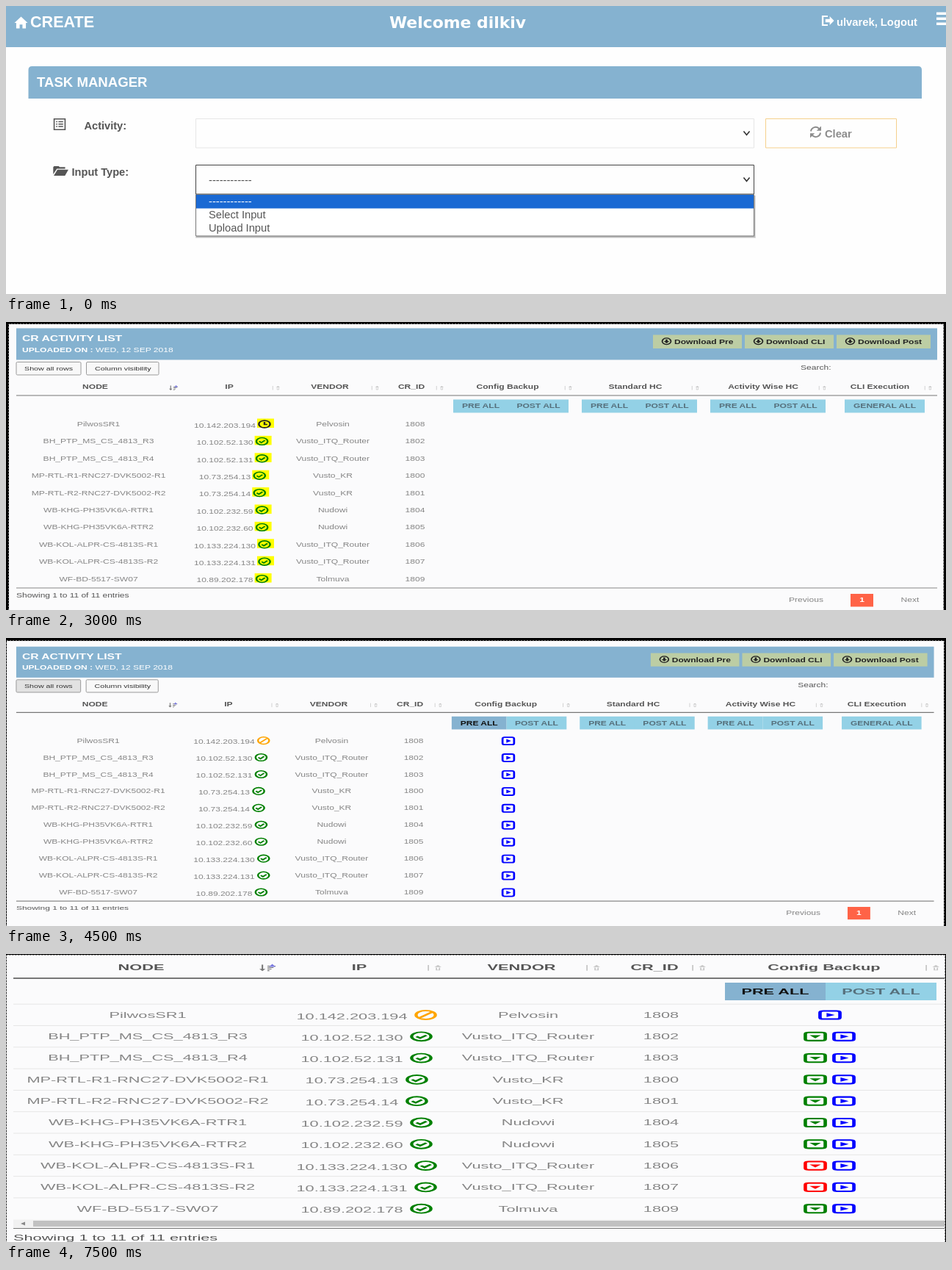
Recreate the animation shown at these times as an HTML page. Size 1280x392 px, loop 8000 ms.

```html
<!DOCTYPE html>
<html lang="en">
<head>
<meta charset="utf-8">
<title>Task manager tour</title>
<style>
html, body { margin: 0; width: 100%; height: 100%; overflow: hidden; background: #fefefe; }
svg { display: block; width: 100%; height: 100%; font-family: "Liberation Sans", Arial, sans-serif; }
.b { font-weight: bold; }
.m { text-anchor: middle; }
.v { font-family: "DejaVu Sans", sans-serif; }
.line { vector-effect: non-scaling-stroke; }
</style>
</head>
<body>
<svg id="stage" viewBox="0 0 1280 392"></svg>
<script>
const BLUE = '#85b2d0', SKY = '#93d1e6', GREEN = '#bccda4', INK = '#555', GREY = '#858585';
let wide = 1; // horizontal stretch of the current scene

const text = (x, y, s, size, fill = INK, cls = '') =>
  `<text transform="translate(${x} ${y}) scale(${wide} 1)" font-size="${size}" fill="${fill}" class="${cls}">${s}</text>`;
const rect = (x, y, w, h, fill, more = '') =>
  `<rect x="${x}" y="${y}" width="${w}" height="${h}" fill="${fill}" ${more}/>`;
const box = (x, y, w, h, stroke, fill = 'none', more = '') =>
  rect(x, y, w, h, fill, `stroke="${stroke}" class="line" ${more}`);
const path = (d, fill, stroke = 'none', w = 1) =>
  `<path d="${d}" fill="${fill}" stroke="${stroke}" stroke-width="${w}"/>`;
const rule = (x1, x2, y, color, w = 1) => path(`M${x1} ${y}H${x2}`, 'none', color, w);

// Icons live in a 16 unit box around 0,0: solid and outlined parts
const ring = 'M-6.8 0A6.8 6.8 0 1 1 6.8 0A6.8 6.8 0 1 1-6.8 0';
const frame = 'M-4.5-6.6H4.5Q7-6.6 7-4V4Q7 6.6 4.5 6.6H-4.5Q-7 6.6-7 4V-4Q-7-6.6-4.5-6.6z';
const icons = {
  home: ['M0-7.5L-8.5.5h2.3V7.5h4.4V2.5h3.6v5h4.4V.5h2.3z', ''],
  list: ['', 'M-7-7.2H7V7.2H-7zM-4.5-3.5h1.6M-1.5-3.5h6M-4.5-.3h1.6M-1.5-.3h6M-4.5 3h1.6M-1.5 3h6', 1.5],
  folder: ['M-8 5V-6l1-1.5h5l1 1.5h6v2.5H-4zM-7.4 7.5l4-9.5H8.5L4.8 7.5z', ''],
  logout: ['M-3-2.2H2.5V-6L8 0 2.5 6V2.2H-3z', 'M0-6H-6.5V6H0', 2.2],
  refresh: ['M7.5-8V-1.8H1.3zM-7.5 8V1.8H-1.3z', 'M-6.5-1A6.5 6.5 0 0 1 5-4.2M6.5 1A6.5 6.5 0 0 1-5 4.2', 2],
  check: ['', ring + 'M-3.4 0L-.8 2.5 3.6-2', 2.2],
  clock: ['', ring + 'M0-4.2V.6H3.5', 2.2],
  ban: ['', ring + 'M-4.8 4.8L4.8-4.8', 2.2],
  play: ['M-2.4-3.4L3.4 0-2.4 3.4z', frame, 2.4],
  caret: ['M-4-2H4L0 2.8z', frame, 2.4],
  down: ['M-1.5-4.2h3V-.4h2.8L0 4.4-4.3-.4h2.8z', ring, 2],
  up: ['M-1.5 4.2h3V.4h2.8L0-4.4-4.3.4h2.8z', ring, 2],
  search: ['', 'M-7-2A4.8 4.8 0 1 1 2.6-2A4.8 4.8 0 1 1-7-2M1.5 1.8L7 7', 2.6],
  tags: ['M-8-6.5H-2.5L4.5 1-1 7-8 0z', 'M0-6.5L7.4 1 2.5 6.5', 1.8],
  sort: ['M4.5-5L8-1H1z', 'M-5-5V6M3 0V5H6V0', 1.2],
  sorted: ['M-8 2.5H-2L-5 7z', 'M-5-6V4M0 6H2M0 3H4M0 0H6M0-3H8', 1.5],
  chevron: ['', 'M-5-3L0 3 5-3', 2],
};
function icon(name, x, y, w, h, color) {
  const [solid, outline, sw] = icons[name];
  return `<g transform="translate(${x} ${y}) scale(${w / 16} ${h / 16})">` +
    path(solid, color) + path(outline, 'none', color, sw) + '</g>';
}

// Black screenshot margin with a dotted inner edge
function edge(l, t, r) {
  const dots = `M${l} 392V${t}H${r}V392`;
  return rect(0, 0, 1280, t, '#000') + rect(0, 0, l, 392, '#000') + rect(r, 0, 1280 - r, 392, '#000') +
    `<path d="${dots}" fill="none" stroke="#ddd" stroke-dasharray="2 2"/>`;
}

function form(open) {
  wide = 1;
  const select = (y, color) => box(258.5, y, 760, 39.5, color) + icon('chevron', 1008.5, y + 19.5, 13, 13, '#333');
  const dashes = '-'.repeat(12);
  let s = path('M30.5 126V87Q30.5 82 35.5 82H1242Q1247 82 1247 87V126z', BLUE) +
    text(42, 110, 'TASK MANAGER', 18.6, '#fff', 'b') +
    icon('list', 73, 161, 17, 16, INK) + text(106.5, 168, 'Activity:', 14.6, INK, 'b') +
    icon('folder', 74.3, 224.5, 20, 14, INK) + text(89.5, 231, 'Input Type:', 14.6, INK, 'b') +
    select(153.5, '#e6e6e6') + select(216.5, open ? '#444' : '#e6e6e6') +
    box(1034.5, 153.5, 178, 39.5, '#f5d08c') +
    icon('refresh', 1102.5, 171.5, 16, 16, '#8c8c8c') + text(1115, 178.5, 'Clear', 14.7, '#8c8c8c', 'b') +
    text(276, 241.5, open ? dashes : 'Select Input', 14.7);
  if (open) s += rect(258, 258, 763, 58, '#000', 'opacity=".13"') + rect(259, 258, 761, 57, '#000', 'opacity=".15"') +
    box(258.5, 256.5, 760, 56.5, '#777', '#fff') + rect(259, 257, 759, 18.5, '#1a69d3') +
    text(276, 271, dashes, 14.7, '#fff') + text(276, 289, 'Select Input', 14.7) + text(276, 307, 'Upload Input', 14.7);
  else s += rect(1034, 216, 178.5, 39.8, '#9cc0d7') + rule(1034, 1212.5, 255.4, BLUE) +
    text(1123.5, 241.5, 'Submit', 14.7, '#fff', 'm');
  return s;
}

function welcome() {
  return rect(0, 0, 1280, 392, '#fefefe') + rect(0, 0, 1280, 56, BLUE) +
    icon('home', 20.5, 22.5, 17, 17, '#fff') + text(33, 29, 'CREATE', 21.6, '#fff', 'b') +
    text(522, 30, 'Welcome dilkiv', 21.9, '#fff', 'b v') +
    icon('logout', 1119, 20, 17, 16, '#fff') + text(1131, 26.5, 'ulvarek, Logout', 14.75, '#fff', 'b') +
    [8.5, 15.5, 22.5].map(y => rect(1267, y, 13, 3.5, '#fff')).join('') + form(true);
}

// Blue title bar with download buttons [x, width, label]
function titleBar(p) {
  let s = rect(p.x, p.y, p.w, p.h, BLUE) + text(p.tx, p.t1, 'CR ACTIVITY LIST', p.big, '#fff', 'b') +
    text(p.tx, p.t2, 'UPLOADED ON :', p.size, '#fff', 'b') + text(p.dx, p.t2, p.date, p.size, '#fff');
  for (const [x, w, label] of p.buttons) s += rect(x, p.by, w, p.bh, GREEN) +
    icon('down', x + p.ix, p.by + p.bh / 2 - .5, p.iw, p.ih, '#222') +
    text(x + p.lx, p.by + p.bh / 2 + p.size * .36, 'Download ' + label, p.size, '#222', 'b');
  return s;
}
const heads = (list, y, size) => list.map(([x, s]) => text(x, y, s, size, INK, 'b m')).join('');
const sorts = (xs, y, w, h) => xs.map((x, i) => i
  ? icon('sort', x, y, w, h, '#c4c4c4')
  : icon('sorted', x, y, w, h, '#777') + path(`M${x + w * .1} ${y - h * .1}l${w * .2} ${-h * .35}l${w * .2} ${h * .35}z`, '#7a7ae0')).join('');
// Button cell [x, width, label]
const cell = (x, w, label, y, h, size, on) => rect(x, y, w, h, on ? BLUE : SKY) +
  text(x + w / 2, y + h / 2 + size * .36, label, size, on ? '#111' : '#56707c', 'b m');
const greyButton = (x, y, w, h, tx, label, size, fill = '#f8f8f8') =>
  box(x, y, w, h, '#9a9a9a', fill, 'rx="1.5"') + text(tx, y + h / 2 + size * .33, label, size, '#333');

function progress() {
  wide = 1.37;
  const f = 10.3;
  let s = rect(0, 0, 1280, 392, '#fafbfd') +
    icon('list', 96.5, 19, 16, 11, INK) + text(113, 23.5, 'Activity:', f, INK, 'b') +
    text(194, 23.5, 'HealthCheck', f) + path('M343.5 18H350L346.7 22.5z', '#222') +
    [178, 356, 563, 901].map(x => rect(x, 9, 1, 24, '#ececee')).join('') +
    icon('folder', 471, 19.3, 18, 11, INK) + text(487.5, 23.5, 'Input File :', f, INK, 'b') +
    box(576, 13, 90.5, 14, '#999', '#f0f0f0') + text(584, 24, 'Choose File', f, '#222') +
    text(671, 24, 'No file chosen', f) +
    rect(930, 8, 172, 25, GREEN) + icon('up', 989, 19.5, 16, 11, INK) + text(1002, 23.5, 'Upload', f, INK, 'b') +
    rect(1117, 8, 78, 25, '#cec2b2') + icon('refresh', 1137, 19.5, 15, 11, '#777') + text(1150, 23.5, 'Clear', f, '#777', 'b');
  const groups = [['HealthCheck', 'PRE', 'POST'], ['Upload_Design CLI', 'GENE'], ['Create_Design CLI', 'GENE']];
  groups.forEach(([title, ...bars], i) => {
    const x = 38 + i * 310.8;
    s += text(x, 116, title, 13.3, '#333', 'b') + rule(x, x + 275, 127, '#aaa', 1.3);
    bars.forEach((label, j) => {
      const y = 144 + j * 21.3;
      s += text(x + 7.5, y, label, f, '#222', 'b') + text(x + 54, y - 2, '0%', 8.55, '#444', 'b') +
        rect(x + 74, y - 9, 169, 8, '#eee');
    });
  });
  s += titleBar({
    x: 28, y: 221.5, w: 1228, h: 52, tx: 38, t1: 242.3, t2: 261.3, big: 13.3, size: f, dx: 155, date: 'THU, 07 MAY 2020',
    by: 231.5, bh: 23.5, ix: 21.5, iw: 16, ih: 12, lx: 33.5,
    buttons: [[804, 142, 'Pre'], [950, 141.5, 'CLI'], [1097, 149, 'Post']],
  });
  s += greyButton(28.5, 278, 102, 21, 41, 'Show all rows', 9.1) + greyButton(139.5, 278, 116, 21, 153, 'Column visibility', 9.1) +
    text(1031, 290.5, 'Search:', f) +
    heads([[76.5, 'NODE'], [249, 'IP'], [432, 'VENDOR'], [555, 'CR_ID'], [712, 'HealthCheck'],
      [924, 'Upload_Design CLI'], [1141, 'Create_Design CLI']], 323.5, f) +
    sorts([123, 359, 491, 603, 806, 1026, 1242], 320.5, 15, 11) +
    rule(28, 1256, 334, '#777', 1.4) + rule(28, 1256, 369, '#e4e4e4') +
    cell(627, 88, 'PRE ALL', 340, 23, f, true) + cell(715, 95, 'POST ALL', 340, 23, f) +
    cell(866, 128, 'GENERAL ALL', 340, 23, f) + cell(1084, 127, 'GENERAL ALL', 340, 23, f) +
    text(82, 386.5, 'NRADB-1', 10.15, GREY, 'm') + text(217, 388.5, '198.51.100.198', 10.15, GREY, 'm') +
    icon('check', 281, 382, 20, 13, 'green') + icon('search', 306, 382, 21, 13, '#111') + icon('tags', 333, 382, 26, 13, '#111') +
    text(438, 386.5, 'Nudowi', 10.15, GREY, 'm') + text(560, 386.5, '5000947', 10.15, GREY, 'm') +
    [718, 930, 1147].map(x => icon('play', x, 382.5, 20, 12.5, 'blue')).join('');
  return s + edge(2, 2, 1278);
}

const nodes = [
  ['PilwosSR1', '10.142.203.194', 'Pelvosin', 1808],
  ['BH_PTP_MS_CS_4813_R3', '10.102.52.130', 'Vusto_ITQ_Router', 1802],
  ['BH_PTP_MS_CS_4813_R4', '10.102.52.131', 'Vusto_ITQ_Router', 1803],
  ['MP-RTL-R1-RNC27-DVK5002-R1', '10.73.254.13', 'Vusto_KR', 1800],
  ['MP-RTL-R2-RNC27-DVK5002-R2', '10.73.254.14', 'Vusto_KR', 1801],
  ['WB-KHG-PH35VK6A-RTR1', '10.102.232.59', 'Nudowi', 1804],
  ['WB-KHG-PH35VK6A-RTR2', '10.102.232.60', 'Nudowi', 1805],
  ['WB-KOL-ALPR-CS-4813S-R1', '10.133.224.130', 'Vusto_ITQ_Router', 1806],
  ['WB-KOL-ALPR-CS-4813S-R2', '10.133.224.131', 'Vusto_ITQ_Router', 1807],
  ['WF-BD-5517-SW07', '10.89.202.178', 'Tolmuva', 1809],
];
// extra(y, i) adds the cells after CR_ID
function rows(p, extra) {
  return nodes.map((row, i) => {
    const y = p.y + p.step * i, base = y + p.size * .37;
    const ipWidth = ((row[1].length - 3) * .556 + .834) * p.size * wide;
    const ix = p.cols[1] + ipWidth / 2 + p.gap;
    const state = i ? 'check' : p.first;
    const color = { check: 'green', clock: '#222', ban: 'orange' }[state];
    return (p.mark ? rect(ix - 10, y - 7.5, 23, 12.5, '#ff0') : '') +
      row.map((s, c) => text(p.cols[c], base + (c == 1 ? 1.7 : 0), s, p.size, GREY, 'm')).join('') +
      icon(state, ix, y, p.iw, p.ih, color) + extra(y, i);
  }).join('');
}

function activity(running) {
  wide = 1.45;
  const f = 8.33;
  let s = titleBar({
    x: 14, y: 8.5, w: 1254, h: 43, tx: 22, t1: 26, t2: 40.7, big: 10.85, size: f, dx: 122, date: 'WED, 12 SEP 2018',
    by: 17.5, bh: 18.5, ix: 18.5, iw: 14, ih: 10, lx: 29,
    buttons: [[881, 121, 'Pre'], [1006, 121, 'CLI'], [1131, 128, 'Post']],
  });
  s += greyButton(14, 54.5, 88, 17.5, 25, 'Show all rows', 7.38, running ? '#e2e2e2' : '#f8f8f8') +
    greyButton(109.5, 54.5, 98.5, 17.5, 121, 'Column visibility', 7.38) + text(1082, 65.3, 'Search:', f) +
    heads([[121.5, 'NODE'], [304, 'IP'], [441, 'VENDOR'], [552, 'CR_ID'], [683, 'Config Backup'],
      [857, 'Standard HC'], [1031, 'Activity Wise HC'], [1190, 'CLI Execution']], 91.3, f) +
    sorts([228, 367, 502, 590, 765, 938, 1111, 1255], 89.5, 12, 8) + rule(14, 1268, 100, '#777', 1.2);
  [609, 784, 959].forEach((x, i) => {
    s += cell(x, 75, 'PRE ALL', 105.5, 18, f, running && !i) + cell(x + 75, 82, 'POST ALL', 105.5, 18, f);
  });
  s += cell(1142, 109, 'GENERAL ALL', 105.5, 18, f) +
    rows({ y: 139, step: 23.4, size: f, cols: [126, 298, 445, 557], gap: 12, iw: 18, ih: 11.5,
      first: running ? 'ban' : 'clock', mark: !running },
      y => running ? icon('play', 686.4, y + .5, 18, 12.5, 'blue') : '') +
    rule(14, 1268, 362, '#888', 1.2) + text(14, 374.5, 'Showing 1 to 11 of 11 entries', 8.28) +
    text(1089.5, 381.3, 'Previous', f, GREY, 'm') + rect(1150, 370, 31, 17.5, '#ff6347') +
    text(1165.5, 381.3, '1', f, '#fff', 'b m') + text(1231, 381.3, 'Next', f, GREY, 'm');
  return s;
}

function results() {
  wide = 2.1;
  const f = 10.35;
  let s = rect(0, 0, 1280, 392, '#fbfbfc') +
    heads([[184, 'NODE'], [481, 'IP'], [702, 'VENDOR'], [883, 'CR_ID'], [1114, 'Config Backup']], 22, f) +
    sorts([356, 582, 798, 942, 1260], 18.5, 22, 11) + rule(10, 1278, 33, '#777', 1.8) +
    cell(979, 137, 'PRE ALL', 39, 24, f, true) + cell(1116, 151, 'POST ALL', 39, 24, f);
  s += rows({ y: 83, step: 29.3, size: f, cols: [193, 471, 711, 892], gap: 25, iw: 31, ih: 14, first: 'ban' }, (y, i) =>
    rule(10, 1278, y - 14.8, '#e6e6e6') + (i
      ? icon('caret', 1102, y, 31, 13.5, i == 7 || i == 8 ? 'red' : 'green') + icon('play', 1141, y, 31, 13.5, 'blue')
      : icon('play', 1122, y, 31, 13.5, 'blue')));
  s += rect(10, 361.5, 1268, 11, '#f1f1f1') + rect(37, 363, 1241, 8, '#c1c1c1') + path('M26 364.5V369.5L20 367z', '#888') +
    rule(10, 1278, 373.5, '#777') + text(10, 390, 'Showing 1 to 11 of 11 entries', f);
  return s + edge(.8, 1.5, 1278.5);
}

const paper = rect(0, 0, 1280, 392, '#fbfbfc');
const scenes = [
  welcome(),
  progress(),
  paper + activity(false) + edge(4, 3, 1276.5),
  paper + `<g transform="matrix(.9965 0 0 .98 0 3.4)">${activity(true)}</g>` + edge(1, 4, 1277),
  rect(0, 0, 1280, 392, '#fefefe') + `<g transform="matrix(1.0444 0 0 1.327 -28.35 -81.2)">${form(false)}</g>`,
  results(),
];
const stage = document.getElementById('stage');
stage.innerHTML = scenes.map(s => `<g display="none">${s}</g>`).join('');

function draw() {
  const now = Math.floor(performance.now() % 8000 / 1500);
  [...stage.children].forEach((g, i) => g.setAttribute('display', i == now ? 'inline' : 'none'));
  requestAnimationFrame(draw);
}
draw();
</script>
</body>
</html>
```
